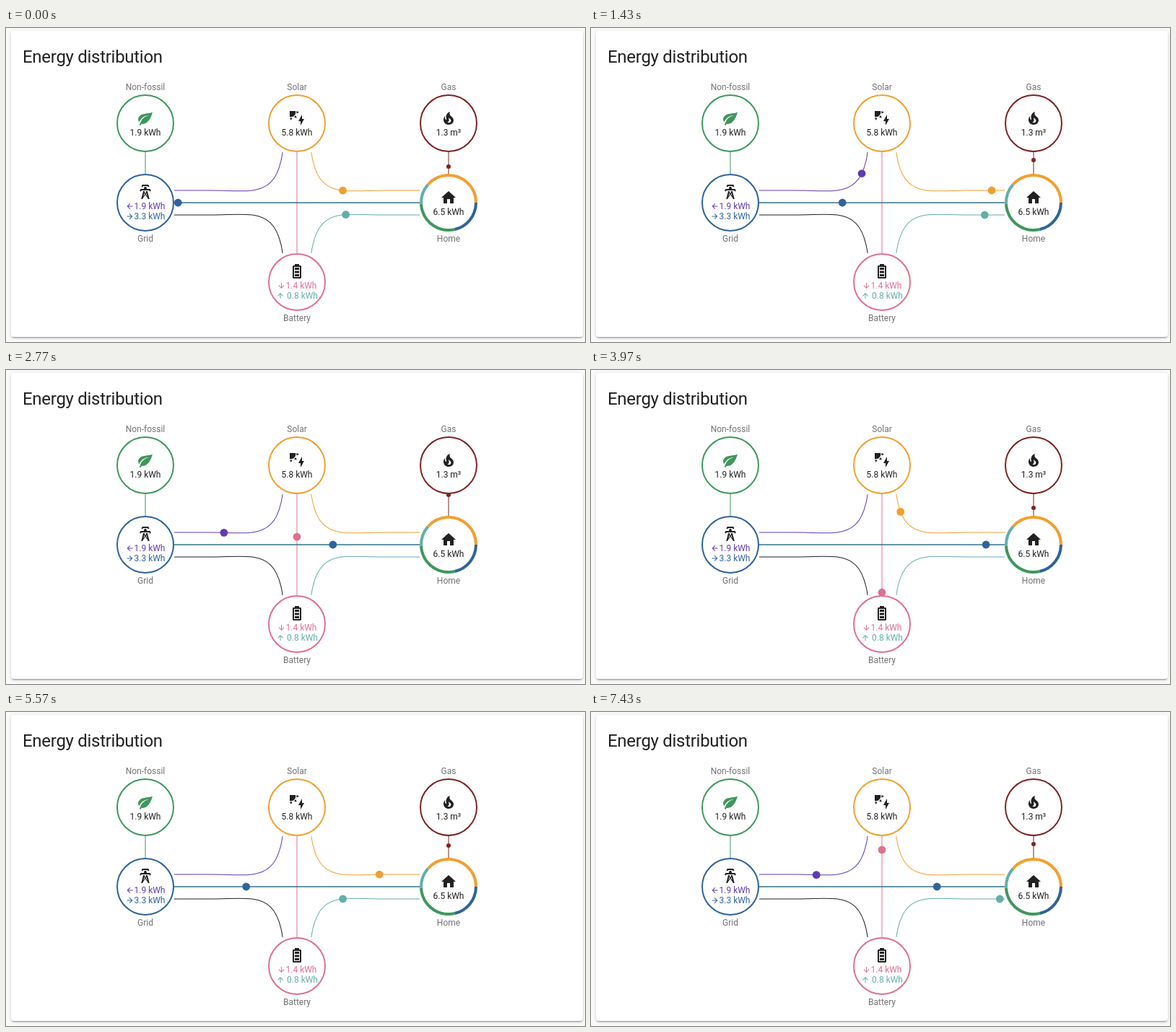
An HTML page that plays this animation: 802 px wide and 435 px high, repeating every 7.46 s.

```html
<!DOCTYPE html>
<html lang="en">
<head>
<meta charset="utf-8">
<title>Energy distribution</title>
<style>
  html, body { margin: 0; width: 100%; height: 100%; overflow: hidden; background: #fafafa; }
  .card {
    position: absolute; left: 7px; top: 4px; width: 792px; height: 424px;
    background: #fff; border-radius: 4px;
    box-shadow: 0 2px 2px rgba(0,0,0,.14), 0 1px 5px rgba(0,0,0,.12), 0 3px 1px -2px rgba(0,0,0,.2);
  }
  #stage { position: absolute; left: 0; top: 0; width: 802px; height: 435px; }
  text { font: 12px Roboto, "Noto Sans", sans-serif; text-anchor: middle; }
  .title { font-size: 24px; letter-spacing: -.012em; text-anchor: start; }
  .wire { fill: none; stroke-width: 1; vector-effect: non-scaling-stroke; }
</style>
</head>
<body>
<div class="card"></div>
<svg id="stage" viewBox="0 0 802 435"></svg>
<script>
const LOOP = 7460;
const STEP = 1000 / 30;
const C = {
  ink: '#212121', label: '#727272', green: '#3f975c', solar: '#f0a030', gas: '#7c2322',
  grid: '#30639a', pink: '#df708f', teal: '#64aeaa', purple: '#603bb0'
};
const ICONS = {
  leaf: 'M17,8C8,10 5.9,16.17 3.82,21.34L5.71,22L6.66,19.7C7.14,19.87 7.64,20 8,20C19,20 22,3 22,3C21,5 14,5.25 9,6.25C4,7.25 2,11.5 2,13.5C2,15.5 3.75,17.25 3.75,17.25C7,8 17,8 17,8Z',
  sun: 'M11.45,2V5.55L15,3.77L11.45,2M10.45,8L8,10.46L11.75,11.71L10.45,8M2,11.45L3.77,15L5.55,11.45H2M10,2H2V10C2.57,10.17 3.17,10.25 3.77,10.25C7.35,10.26 10.26,7.35 10.27,3.75C10.26,3.16 10.17,2.57 10,2M17,22V16H14L19,7V13H22L17,22Z',
  fire: 'M17.66 11.2C17.43 10.9 17.15 10.64 16.89 10.38C16.22 9.78 15.46 9.35 14.82 8.72C13.33 7.26 13 4.85 13.95 3C13 3.23 12.17 3.75 11.46 4.32C8.87 6.4 7.85 10.07 9.07 13.22C9.3 13.9 8.6 14.3 8 13.76C6.87 12.33 6.69 10.28 7.45 8.64C5.78 10 4.87 12.3 5 14.47C5.1 15.6 5.4 16.7 6 17.7C7.08 19.43 8.95 20.67 10.96 20.92C13.1 21.19 15.39 20.8 17.03 19.32C18.86 17.66 19.5 15 18.56 12.72C18.3 12.2 18 11.6 17.66 11.2M14.5 17.5C13.2 18.6 11.5 18.3 10.5 17.28C11.69 17 12.4 16.12 12.61 15.23C12.78 14.43 12.46 13.77 12.33 13C12.21 12.26 12.23 11.63 12.5 10.94C12.69 11.32 12.89 11.7 13.13 12C13.9 13 15.11 13.44 15.37 14.8C15.6 15.8 15.2 16.9 14.5 17.5Z',
  tower: 'M8.28,5.45L6.5,4.55L7.76,2H16.23L17.5,4.55L15.72,5.44L15,4H9L8.28,5.45M18.62,8H14.09L13.3,5H10.7L9.91,8H5.38L4.1,10.55L5.89,11.44L6.62,10H17.38L18.1,11.45L19.89,10.56L18.62,8M17.77,22H15.7L15.46,21.1L12,15.9L8.53,21.1L8.3,22H6.23L9.12,11H11.19L10.83,12.35L12,14.1L13.16,12.35L12.81,11H14.88L17.77,22M11.4,15L10.5,13.65L9.32,18.13L11.4,15M14.68,18.12L13.5,13.64L12.6,15L14.68,18.12Z',
  house: 'M10,20V14H14V20H19V12H22L12,3L2,12H5V20H10Z',
  battery: 'M16 20H8V6H16M16.67 4H15V2H9V4H7.33C6.6 4 6 4.6 6 5.33V20.67C6 21.4 6.6 22 7.33 22H16.67C17.4 22 18 21.4 18 20.67V5.33C18 4.6 17.4 4 16.67 4M15 16H9V19H15V16M15 7H9V10H15V7M15 11.5H9V14.5H15V11.5Z',
  arrow: 'M20,11V13H8L13.5,18.5L12.08,19.92L4.16,12L12.08,4.08L13.5,5.5L8,11H20Z'
};

const stage = document.getElementById('stage');

function add(parent, tag, attrs, content) {
  const el = document.createElementNS('http://www.w3.org/2000/svg', tag);
  for (const key in attrs) el.setAttribute(key, attrs[key]);
  if (content) el.textContent = content;
  parent.appendChild(el);
  return el;
}
const text = (x, y, content, fill = C.ink) => add(stage, 'text', { x, y, fill }, content);
const icon = (name, cx, cy, fill = C.ink) =>
  add(stage, 'path', { d: ICONS[name], fill, transform: `translate(${cx - 12} ${cy - 12})` });
const arrow = (cx, cy, angle, fill) =>
  add(stage, 'path', { d: ICONS.arrow, fill,
    transform: `translate(${cx} ${cy}) rotate(${angle}) scale(.5) translate(-12 -12)` });
const wire = (parent, d, stroke, width = 1) =>
  add(parent, 'path', { d, stroke, class: 'wire', style: `stroke-width:${width}` });

add(stage, 'text', { x: 23, y: 48, fill: C.ink, class: 'title' }, 'Energy distribution');

// Wires: 100 x 100 units, cropped to the band between the circles
const web = add(stage, 'svg', { x: 233, y: 172, width: 340, height: 140,
  viewBox: '0 0 100 100', preserveAspectRatio: 'xMidYMid slice' });
const elbow = (sx, sy) =>
  `M${50 + 5 * sx},${50 - 50 * sy} v${15 * sy} c0,${35 * sy} ${10 * sx},${30 * sy} ${30 * sx},${30 * sy} h${20 * sx}`;

const wires = {
  purple: wire(web, elbow(-1, 1), C.purple),
  ink: wire(web, elbow(-1, -1), C.ink),
  solar: wire(web, elbow(1, 1), C.solar),
  teal: wire(web, elbow(1, -1), C.teal),
  pink: wire(web, 'M50,0 V100', C.pink),
  grid: wire(web, 'M0,50 H100', '#33708d', 1.3)
};

const leafPipe = add(stage, 'svg', { x: 153, y: 172, width: 80, height: 30 });
wire(leafPipe, 'M40,0 V30', C.green);
const gasPipe = add(stage, 'svg', { x: 573, y: 172, width: 80, height: 30 });
const gasWire = wire(gasPipe, 'M40,0 V30', C.gas);

// Each dot runs its wire at constant speed: start is in path units, period in ms
function makeDot(parent, path, fill, r, start, period) {
  return { path, length: path.getTotalLength(), start, period,
    el: add(parent, 'circle', { r, fill }) };
}
const R = 5.4 / 3.4;
const dots = [
  makeDot(web, wires.purple, C.purple, R, 12.38, 4833),
  makeDot(web, wires.solar, C.solar, R, 51.1, 4733),
  makeDot(web, wires.teal, C.teal, R, 52.4, 5608),
  makeDot(web, wires.pink, C.pink, R, 94.5, 5291),
  makeDot(web, wires.grid, C.grid, R, 0.79, 4331),
  makeDot(gasPipe, gasWire, C.gas, 3, 19.5, 2000)
];

function node(cx, cy, color, label, labelY) {
  if (color) add(stage, 'circle', { cx, cy, r: 39, fill: 'none', stroke: color, 'stroke-width': 2 });
  text(cx, labelY, label, C.label);
}
node(193, 132, C.green, 'Non-fossil', 86);
node(403, 132, C.solar, 'Solar', 86);
node(613, 132, C.gas, 'Gas', 86);
node(193, 242, C.grid, 'Grid', 296);
node(613, 242, null, 'Home', 296);
node(403, 352, C.pink, 'Battery', 406);

// Home ring: [colour, start angle, end angle], clockwise from the right
for (const [stroke, from, to] of [
  [C.grid, 0, 77], [C.green, 77, 177.2], [C.teal, 177.2, 221.5], [C.solar, 221.5, 360]
]) {
  add(stage, 'circle', { cx: 613, cy: 242, r: 38, fill: 'none', stroke, 'stroke-width': 4,
    pathLength: 360, 'stroke-dasharray': `${to - from} 360`, transform: `rotate(${from} 613 242)` });
}

icon('leaf', 193, 125, C.green);
icon('sun', 403, 125);
icon('fire', 613, 125);
icon('tower', 193, 227);
icon('house', 613, 235);
icon('battery', 403, 337);

text(193, 149, '1.9 kWh');
text(403, 149, '5.8 kWh');
text(613, 149, '1.3 m³');
text(613, 259, '6.5 kWh');
arrow(171.5, 247, 0, C.purple);
text(199, 251, '1.9 kWh', C.purple);
arrow(171.5, 261, 180, C.grid);
text(199, 265, '3.3 kWh', C.grid);
arrow(381.5, 357, -90, C.pink);
text(409, 361, '1.4 kWh', C.pink);
arrow(380, 371, 90, C.teal);
text(410.5, 375, '0.8 kWh', C.teal);

function render(ms) {
  // The picture advances 30 times a second; the first tick is held
  const time = Math.max(1, Math.floor((ms + 3.4) / STEP)) * STEP;
  for (const { path, length, start, period, el } of dots) {
    const p = path.getPointAtLength((start + time / period * length) % length);
    el.setAttribute('cx', p.x);
    el.setAttribute('cy', p.y);
  }
}

const began = performance.now();
function tick() {
  render((performance.now() - began) % LOOP);
  requestAnimationFrame(tick);
}
tick();
</script>
</body>
</html>
```
